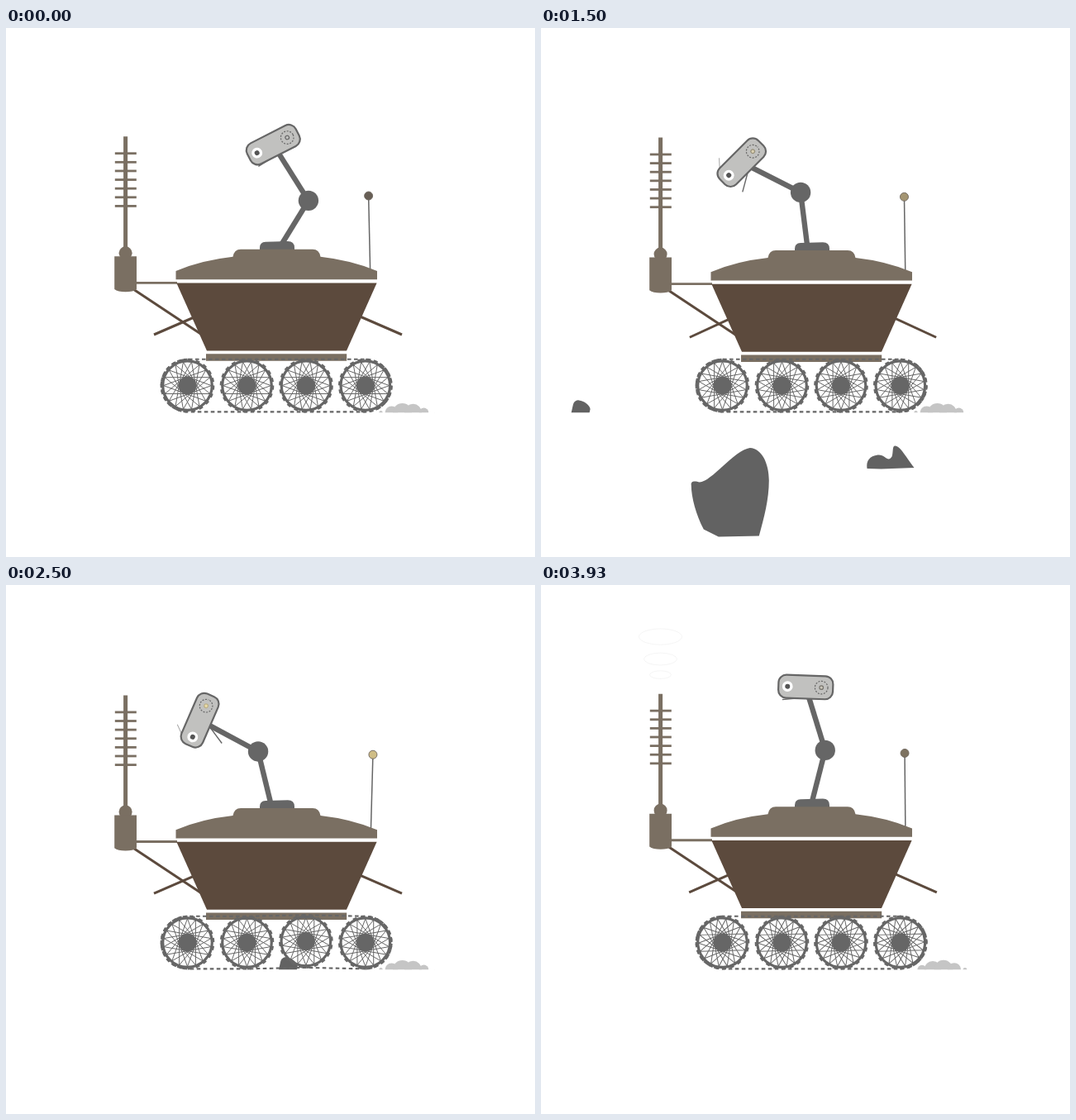
Animation of 640x640 px, one loop 4 s. Source, as an HTML page with a canvas:

```html
<!DOCTYPE html>
<html lang="en">
<head>
<meta charset="utf-8">
<title>Rover</title>
<style>
html, body { margin: 0; width: 100%; height: 100%; overflow: hidden; background: #fff; }
canvas { display: block; width: 640px; height: 640px; }
</style>
</head>
<body>
<canvas id="stage" width="640" height="640"></canvas>
<script>
const ctx = document.getElementById('stage').getContext('2d');
const LOOP = 4000, FPS = 14, TAU = Math.PI * 2;
const GREY = '#666666', ROCK = '#626262', TAUPE = '#7a6f62', BROWN = '#5c4a3d';
const GROUND = 465.3, ROLL = 294;
const WHEELS = [219.5, 291.5, 363, 434.8];

const clamp = (v) => Math.max(0, Math.min(1, v));
const smooth = (v) => { const u = clamp(v); return u * u * (3 - 2 * u); };
const rad = (deg) => deg * Math.PI / 180;
const mix = (a, b, p) => a.map((v, i) => Math.round(v + (b[i] - v) * p));
const rgb = (c) => `rgb(${c.join(',')})`;

// Pose keys of the camera arm, timed in steps of 1/14 s.
const KEY_STEPS = [0, 14, 21, 29, 35, 43, 55, 56];
const POSE = {
  upper: [31.6, 2, -7.1, 3.2, -13.7, 14.3, 14.3, 31.6],
  fore: [-32.2, -59, -63.1, -55.4, -61.8, -49.7, -17.1, -32.2],
  head: [-27, -21.5, -45, -40.5, -66.6, -43, 2, -27],
  flap: [5, 33, 30, 33, 60, 51, 7, 5],
  whisker: [0, 1, 1, 1, 1, 1, 0, 0]
};

function pose(name, t) {
  const step = t * FPS, values = POSE[name];
  let i = 0;
  while (i < KEY_STEPS.length - 2 && step >= KEY_STEPS[i + 1]) i++;
  const p = smooth((step - KEY_STEPS[i]) / (KEY_STEPS[i + 1] - KEY_STEPS[i]));
  return values[i] + (values[i + 1] - values[i]) * p;
}

// A soft pulse repeating every 0.4 s.
function pulse(t, peak, hold, width) {
  const x = (t / 0.4) % 1;
  let d = Math.abs(x - peak);
  d = Math.min(d, 1 - d);
  return smooth(1 - (d - hold) / width);
}

function at(x, y, angle, draw) {
  ctx.save();
  ctx.translate(x, y);
  ctx.rotate(rad(angle));
  draw();
  ctx.restore();
}

function line(x1, y1, x2, y2, color, width) {
  ctx.strokeStyle = color;
  ctx.lineWidth = width;
  ctx.beginPath();
  ctx.moveTo(x1, y1);
  ctx.lineTo(x2, y2);
  ctx.stroke();
}

function disc(x, y, r, color) {
  ctx.fillStyle = color;
  ctx.beginPath();
  ctx.arc(x, y, r, 0, TAU);
  ctx.fill();
}

function ring(x, y, r, color, width, dash = []) {
  ctx.strokeStyle = color;
  ctx.lineWidth = width;
  ctx.setLineDash(dash);
  ctx.beginPath();
  ctx.arc(x, y, r, 0, TAU);
  ctx.stroke();
  ctx.setLineDash([]);
}

function shape(path, color) {
  ctx.fillStyle = color;
  ctx.fill(new Path2D(path));
}

const pebbleX = (t) => 48 + 293.3 * (t - 1.5);

function bump(wheelX, t) {
  const d = Math.abs(pebbleX(t) - wheelX) / 28;
  return d < 1 ? Math.cos(d * Math.PI / 2) ** 2 : 0;
}

function drawPebble(t) {
  const x = pebbleX(t);
  ctx.save();
  ctx.beginPath();
  ctx.rect(0, 400, 640, GROUND - 400);
  ctx.clip();
  at(x, 458, 22 * smooth((x - 435) / 60), () =>
    shape('M-11.5 8L-9-3Q-7-8-2-7.6C4-7 11-2 11.6 3L10.5 8Z', ROCK));
  ctx.restore();
}

function drawForeground(t) {
  const hillX = 289 + 325 * (t - 1) - 17.8 * (t - 1) * (t - 1.5);
  at(hillX, 532.5, 0, () => shape(
    'M0-.5L-40 1L-57 .5Q-59-14-44-16C-35-17-32-6-27-14C-25-19-27-27-23-27C-17-27-9-12 0-.5Z', ROCK));
  const boulderX = 275.8 + 528 * (t - 1.5) - 42 * (t - 1.5) * (t - 2.07);
  at(boulderX, 507.5, 0, () => shape(
    'M-94 46C-95 39-88 41-84 42C-70 42-42 3-23 .5C-9 1 0 19 0 40C0 63-6 85-12 107L-61 108L-79 99C-88 82-94 60-94 46Z', ROCK));
}

function drawDust(t) {
  const gap = 13, shift = (1.5 + t * 6 * gap) % gap;
  ctx.save();
  ctx.beginPath();
  ctx.rect(440, 440, 90, GROUND - 440);
  ctx.clip();
  for (let x = 439 + shift; x < 520; x += gap) {
    const p = (x - 447) / 73;
    if (p > 0 && p < 1) disc(x, GROUND, 11.6 * Math.sin(p * Math.PI) ** 1.3, '#c5c5c5');
  }
  ctx.restore();
}

function drawWheel(x, y, t) {
  at(x, y, -540 * t, () => {
    const points = 18, skip = 7;
    ctx.strokeStyle = GREY;
    ctx.lineWidth = 1;
    ctx.beginPath();
    for (let i = 0; i <= points; i++) {
      const a = i * skip / points * TAU;
      ctx.lineTo(29 * Math.cos(a), 29 * Math.sin(a));
    }
    ctx.stroke();
    disc(0, 0, 10.6, GREY);
    ring(0, 0, 29.8, GREY, 3.2);
    ring(0, 0, 31.8, GREY, 2, [5, 5]);
  });
}

function drawTrack(wheels, t) {
  const r = 31.8, first = wheels[0], last = wheels[3];
  ctx.strokeStyle = GREY;
  ctx.lineWidth = 2.1;
  ctx.setLineDash([4.6, 3.4]);
  ctx.lineDashOffset = -ROLL * t;
  ctx.beginPath();
  ctx.arc(first.x, first.y, r, -Math.PI / 2, Math.PI / 2, true);
  wheels.forEach((w) => ctx.lineTo(w.x, w.y + r));
  ctx.arc(last.x, last.y, r, Math.PI / 2, -Math.PI / 2, true);
  [...wheels].reverse().forEach((w) => ctx.lineTo(w.x, w.y - r));
  ctx.stroke();
  ctx.setLineDash([]);
}

function drawSignal(t) {
  const s = (t * 1000) % 1500;
  const fade = clamp((970 - s) / 330);
  [[250, 69.5, 26], [420, 42.5, 20], [590, 23.5, 13]].forEach(([start, rise, rx]) => {
    const u = clamp((s - start) / (960 - start));
    const alpha = 0.5 * clamp(u * 2) * fade;
    if (alpha <= 0) return;
    const p = 1 - (1 - u) ** 2;
    ctx.strokeStyle = `rgba(102,102,102,${alpha})`;
    ctx.lineWidth = 1;
    ctx.beginPath();
    ctx.ellipse(144.5, 131.5 - rise * p, rx * p, rx * p * 0.37, 0, 0, TAU);
    ctx.stroke();
  });
}

function drawMast(lean, t) {
  at(146, 310, lean, () => {
    ctx.translate(-146, -310);
    line(144.6, 131.2, 144.6, 268, TAUPE, 5);
    for (let i = 0; i < 7; i++) line(131.8, 151.7 + i * 10.62, 157.8, 151.7 + i * 10.62, TAUPE, 2.8);
    disc(144.6, 272.3, 8, TAUPE);
    shape('M131.2 276.3H158V316Q154 319.3 144.6 319.3T131.2 316Z', TAUPE);
    drawSignal(t);
  });
}

function drawCamera(t, glow) {
  const flap = rad(pose('flap', t)), open = pose('whisker', t);
  line(-2, 13, -2 - 26 * Math.cos(flap), 13 + 26 * Math.sin(flap), GREY, 1.4);
  if (open > 0) {
    const a = rad(48 * open);
    line(-24.5, -13, -24.5 + 13.5 * Math.cos(a), -13 - 13.5 * Math.sin(a), '#a0a0a0', 0.9);
  }
  ctx.beginPath();
  ctx.roundRect(-33, -14, 66, 28, 9.5);
  ctx.fillStyle = '#c1c1bf';
  ctx.fill();
  ctx.strokeStyle = GREY;
  ctx.lineWidth = 2.2;
  ctx.stroke();
  disc(-22, 0, 6.4, '#fff');
  disc(-22, 0, 3, '#555');
  ring(19, 0, 7.8, GREY, 1.2, [2, 1.6]);
  disc(19, 0, 2.3, rgb(mix([193, 193, 191], [255, 232, 156], glow)));
  ring(19, 0, 2.3, rgb(mix([102, 102, 102], [225, 208, 150], glow)), 1.2);
}

function drawArm(t, glow) {
  const length = 80, upper = rad(pose('upper', t)), fore = rad(pose('fore', t));
  const ex = 324 + length * Math.sin(upper), ey = 277 - length * Math.cos(upper);
  const hx = ex + length * Math.sin(fore), hy = ey - length * Math.cos(fore);
  line(324, 277, ex, ey, GREY, 6.4);
  line(ex, ey, hx, hy, GREY, 6.4);
  disc(ex, ey, 12.2, GREY);
  at(hx, hy, pose('head', t), () => drawCamera(t, glow));
}

function drawRod(lean, glow) {
  at(441, 310, lean, () => {
    line(0, -9, 0, -107, GREY, 1.5);
    disc(0, -107, 5, rgb(mix([104, 95, 86], [255, 232, 156], glow)));
    ring(0, -107, 5, '#6e665e', 0.9);
  });
}

function drawBody(t, tilt, jolt, glow) {
  const swing = 3.3 * pulse(t, 0.57, 0.03, 0.27) - 6.5 * jolt;
  const phase = TAU * t / 0.4;
  const sway = 1.5 * Math.sin(phase - 0.65) - Math.sin(2 * phase + 0.38);
  at(327, 398 + 3.2 * glow, tilt, () => {
    ctx.translate(-327, -398);
    at(262, 335, -swing, () => line(0, 0, -83, 36, BROWN, 3));
    at(396, 335, swing, () => line(0, 0, 83, 36, BROWN, 3));
    line(154, 316, 243, 375, BROWN, 3);
    line(156, 308.3, 207, 308.3, TAUPE, 2.8);
    drawMast(tilt * 1.1, t);
    drawRod(sway + tilt * 6.5, glow);
    drawArm(t, glow);
    shape('M307 269V266Q307 259 314 258.8L341 258Q349 258 349 266V269Z', GREY);
    shape('M205.5 304.2V294Q236 281 274.5 276.8Q276 267.8 284 267.8H371Q379 267.8 380.5 276.8Q418 281 449 294V304.2Z', TAUPE);
    shape('M206.3 308.5H448.6L412 390.6H243Z', BROWN);
    shape('M242 394.2H412.2V402.7H242Z', TAUPE);
  });
}

function draw(t) {
  ctx.fillStyle = '#fff';
  ctx.fillRect(0, 0, 640, 640);
  const front = bump(WHEELS[0], t), rear = bump(WHEELS[3], t);
  const glow = pulse(t, 0.465, 0.08, 0.36);
  const wheels = WHEELS.map((x) => {
    const lift = bump(x, t);
    return { x: x - 1.2 * lift, y: 432.6 - 12.4 * lift };
  });
  drawBody(t, 2.6 * (front - rear), front + rear, glow);
  drawPebble(t);
  wheels.forEach((w) => drawWheel(w.x, w.y, t));
  drawTrack(wheels, t);
  drawDust(t);
  drawForeground(t);
}

function tick() {
  const ms = (performance.now() + 4) % LOOP;
  draw(Math.floor(ms * FPS / 1000) / FPS);
  requestAnimationFrame(tick);
}
tick();
</script>
</body>
</html>
```
